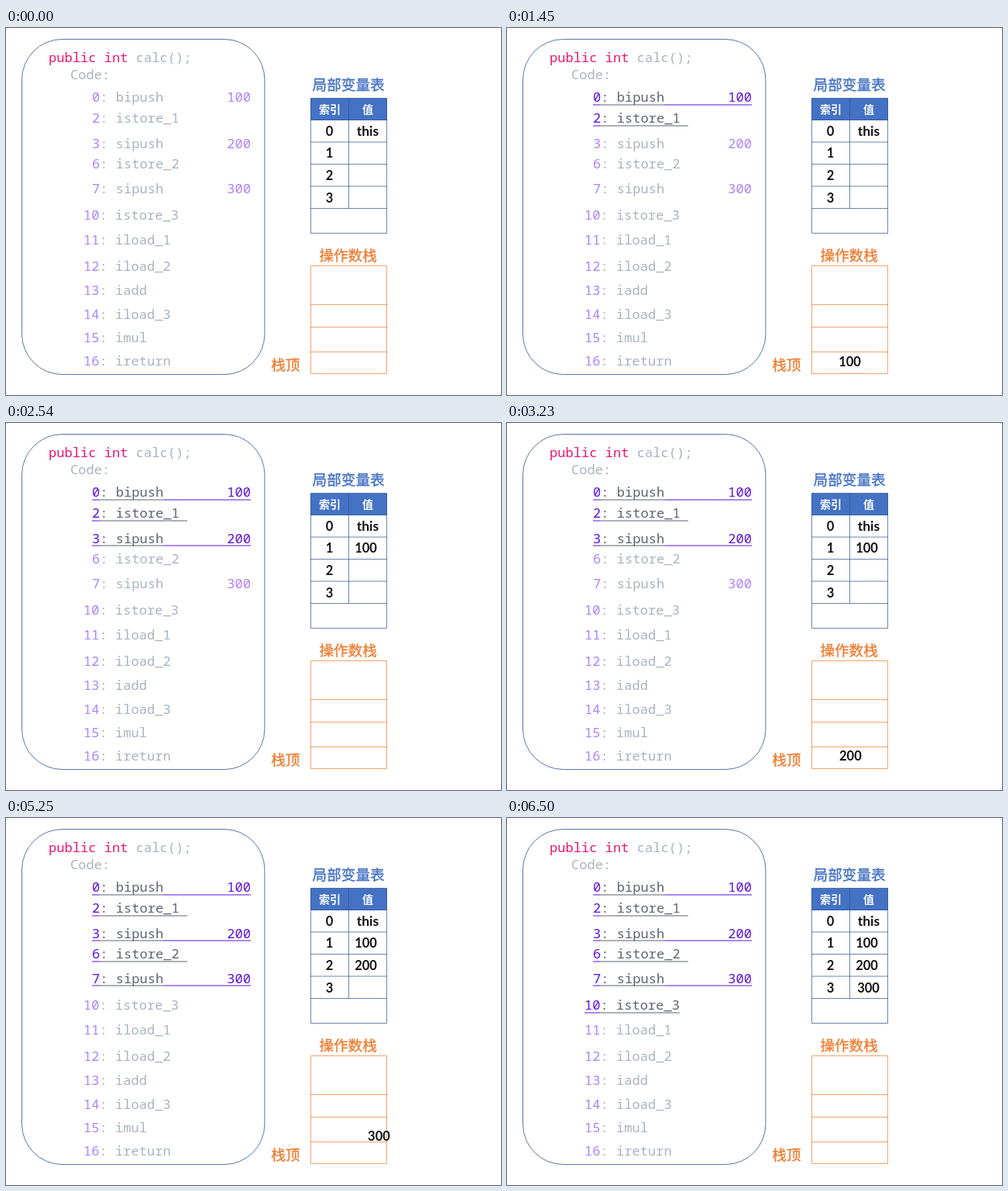
Recreate the animation shown at these times as an HTML page. Size 639 px wide and 473 px high, loop 7.59 s.

```html
<!DOCTYPE html>
<html lang="zh">
<head>
<meta charset="utf-8">
<title>Bytecode stack</title>
<style>
  html, body { margin: 0; width: 100%; height: 100%; overflow: hidden; background: #fff; }
  svg { display: block; width: 639px; height: 473px; }
  .code { font: 17.08px "Noto Sans Mono", monospace; white-space: pre; fill: #a9b2c0; }
  .num { fill: #ae81ff; }
  .key { fill: #f0146e; }
  .lit { fill: #5c6370; }
  .lit .num { fill: #5a10dc; }
  .label { font: 500 18.6px "Noto Sans CJK SC", "Noto Sans CJK", sans-serif; stroke-width: .35; }
  .head { font: bold 14px "Noto Sans CJK SC", "Noto Sans CJK", sans-serif; fill: #fff; text-anchor: middle; }
  .cell { font: bold 16.5px Lato, sans-serif; fill: #111; text-anchor: middle; }
  .blue { fill: #4472c4; }
  .orange { fill: #ed7d31; }
  .label.blue { stroke: #4472c4; }
  .label.orange { stroke: #ed7d31; }
  .line { fill: none; stroke: #2f528f; stroke-opacity: .8; }
  .grid { stroke-opacity: .7; }
  .stack { fill: none; stroke: #ed7d31; stroke-opacity: .7; }
</style>
</head>
<body>
<svg id="stage" viewBox="0 0 639 473">
  <rect class="line" x="20.5" y="14.5" width="313.4" height="432" rx="52"/>
  <text class="code" x="55" y="44"><tspan class="key">public int</tspan> calc();</text>
  <text class="code" x="83" y="66">Code:</text>
  <g id="code"></g>

  <text class="label blue" x="395.6" y="79.5">局部变量表</text>
  <rect class="blue" x="393" y="90.5" width="99" height="28.5"/>
  <path class="line grid" d="M393.5 90.5H491.5V264.5H393.5ZM393 118.5H492M393 147H492M393 175.5H492M393 204H492M393 232.5H492M442.5 90.5V232.5"/>
  <text class="head" x="418" y="109.5">索引</text>
  <text class="head" x="467" y="109.5">值</text>
  <g class="cell">
    <text x="417.5" y="139">0</text>
    <text x="467" y="139" font-size="17.5">this</text>
    <text x="417.5" y="167">1</text>
    <text x="417.5" y="196">2</text>
    <text x="417.5" y="224.5">3</text>
  </g>

  <text class="label orange" x="404.4" y="300">操作数栈</text>
  <path class="stack" d="M393.5 306.5H491.5V445.5H393.5ZM393 356.5H492M393 385.5H492M393 417.5H492"/>
  <text class="label orange" x="342.2" y="440.5">栈顶</text>
  <g id="values" class="cell"></g>
</svg>
<script>
const LOOP = 7590, STEP = 40, FADE = 400, PUSH = 500, STORE = 520;
const ADVANCE = 10.25;
const TOP = [442.5, 430];

// index, baseline, instruction, operand, highlight start
const rows = [
  [0, 95, 'bipush', 100, 0],
  [2, 122, 'istore_1', '', 1050],
  [3, 154.5, 'sipush', 200, 2140],
  [6, 181, 'istore_2', '', 3230],
  [7, 212.5, 'sipush', 300, 4320],
  [10, 247, 'istore_3', '', 5370],
  [11, 278.5, 'iload_1'],
  [12, 313, 'iload_2'],
  [13, 344, 'iadd'],
  [14, 374.5, 'iload_3'],
  [15, 405, 'imul'],
  [16, 435, 'ireturn']
];

// text, push start, store start, height of its code row, final cell centre
const values = [
  [100, 570, 1660, 89, [464.5, 161.5]],
  [200, 2750, 3800, 148.5, [464.5, 190]],
  [300, 4890, 5980, 207, [466.5, 219.5]]
];

function add(parent, tag, attrs, html = '') {
  const node = document.createElementNS('http://www.w3.org/2000/svg', tag);
  for (const name in attrs) node.setAttribute(name, attrs[name]);
  node.innerHTML = html;
  return parent.appendChild(node);
}

function underline(parent, x, y, from, to, color) {
  add(parent, 'path', { d: `M${x + from * ADVANCE} ${y}H${x + to * ADVANCE}`, stroke: color });
}

const codeLayer = document.getElementById('code');
const highlights = [];
for (const [index, y, name, operand, start] of rows) {
  const x = index < 10 ? 111 : 100;
  const digits = String(index).length;
  const html = `<tspan class="num">${index}</tspan>: ${name}` +
    (operand ? `<tspan class="num" x="${x + 17 * ADVANCE}">${operand}</tspan>` : '');
  const plain = add(codeLayer, 'text', { class: 'code', x, y }, html);
  if (start === undefined) continue;

  const group = add(codeLayer, 'g', {});
  add(group, 'text', { class: 'code lit', x, y }, html);
  const lineY = Math.floor(y) + 4;
  underline(group, x, lineY, 0, digits, '#5a10dc');
  underline(group, x, lineY, digits, operand ? 9 : 12, '#5c6370');
  if (operand) underline(group, x, lineY, 9, 20, '#5a10dc');
  highlights.push({ plain, group, start });
}

const valueLayer = document.getElementById('values');
const movers = values.map(([text, push, store, rowY, cell]) => {
  const rise = TOP[1] - cell[1];
  return {
    node: add(valueLayer, 'text', {}, text), push, store,
    pushPath: [[300, rowY], [593, rowY + 23], [625, 349], TOP],
    storePath: [TOP, [TOP[0] + 163, TOP[1] - .19 * rise], [cell[0] + 163, cell[1] + .19 * rise], cell]
  };
});

function bezier([a, b, c, d], t) {
  const u = 1 - t;
  return [0, 1].map(i => u * u * u * a[i] + 3 * u * u * t * b[i] + 3 * u * t * t * c[i] + t * t * t * d[i]);
}

// Progress from 0 to 1, advancing in whole steps.
function progress(time, start, length) {
  const elapsed = Math.floor((time - start) / STEP + 1e-6) * STEP;
  return Math.max(0, Math.min(1, elapsed / length));
}

function draw(time) {
  for (const { plain, group, start } of highlights) {
    const p = progress(time, start, FADE);
    group.setAttribute('opacity', p);
    plain.setAttribute('opacity', p < 1 ? 1 : 0);
  }
  for (const { node, push, store, pushPath, storePath } of movers) {
    const pushed = progress(time, push, PUSH);
    const stored = progress(time, store, STORE);
    const [x, y] = stored > 0
      ? bezier(storePath, stored ** 1.35)
      : bezier(pushPath, 1 - (1 - pushed) ** 2);
    node.setAttribute('visibility', pushed > 0 ? 'visible' : 'hidden');
    node.setAttribute('x', x);
    node.setAttribute('y', y + 5.8);
  }
}

const origin = performance.now();
function tick() {
  draw((performance.now() - origin) % LOOP);
  requestAnimationFrame(tick);
}
draw(0);
requestAnimationFrame(tick);
</script>
</body>
</html>
```
